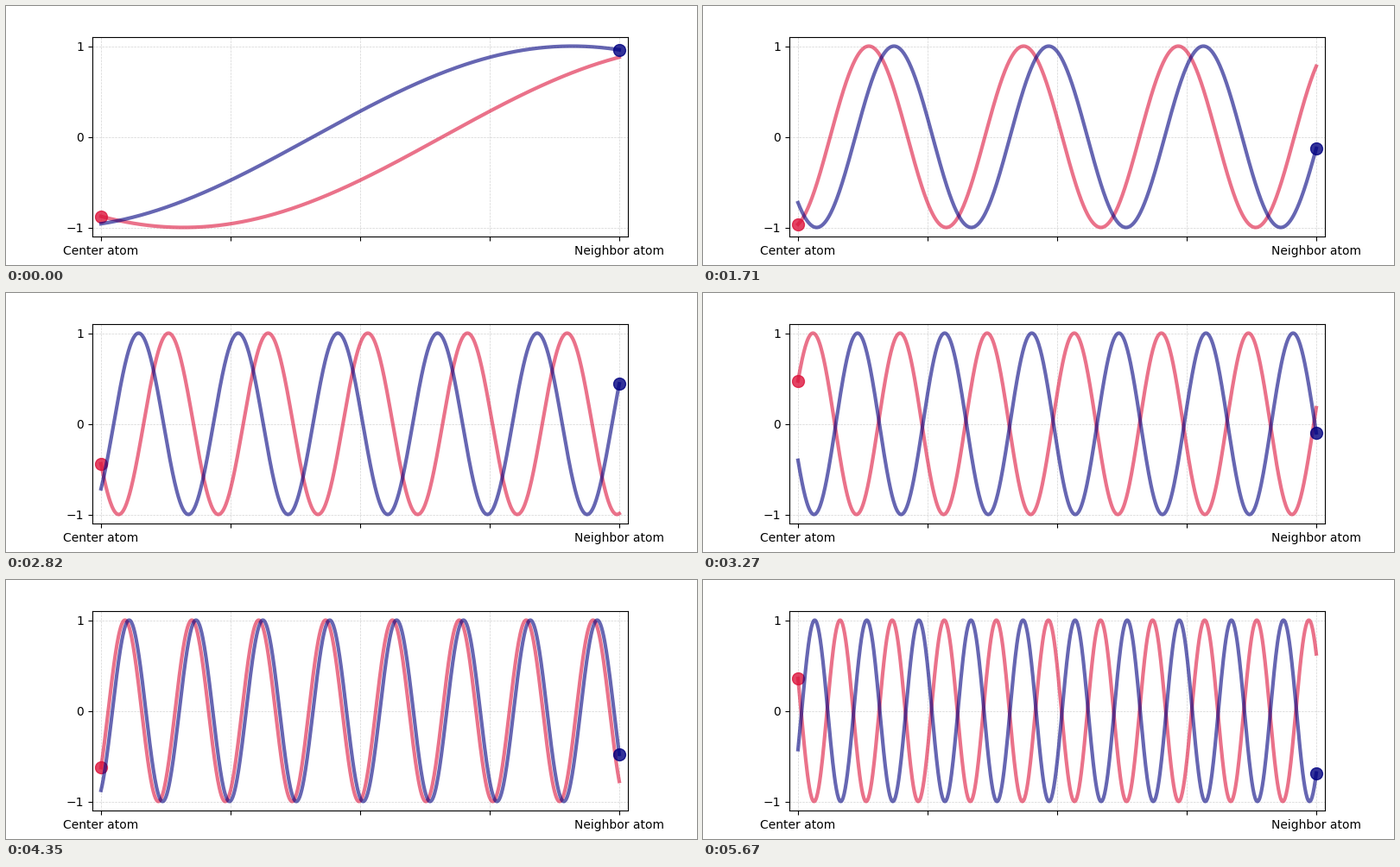
These frames come from a looping animation (800 by 300 pixels, 5700 ms). A matplotlib script:

```python
import numpy as np
import matplotlib.pyplot as plt
from matplotlib.animation import FuncAnimation

FRAMES = 190
INTERVAL = 30

# Each wave is pinned to a node at x = NODE while its wavenumber grows.
RED_NODE = 29 / 44
BLUE_NODE = 18 / 44

x = np.linspace(0, 1, 1000)


def wave(x, node, k):
    return np.sin(k * (x - node))


fig, ax = plt.subplots(figsize=(8, 3), dpi=100)
ax.set_xlim(-1 / 60, 61 / 60)
ax.set_ylim(-1.1, 1.1)
ax.set_xticks(np.linspace(0, 1, 5), ["Center atom", "", "", "", "Neighbor atom"])
ax.set_yticks([-1, 0, 1], ["\u22121", "0", "1"])
ax.grid(color="lightgrey", linestyle="--", linewidth=0.5)


def add_wave(color, node, end):
    line, = ax.plot([], [], color=color, lw=3, alpha=0.6)
    dot, = ax.plot([], [], "o", color=color, ms=10, alpha=0.8)
    return line, dot, node, end


waves = [add_wave("crimson", RED_NODE, 0), add_wave("navy", BLUE_NODE, 1)]


def update(frame):
    k = np.pi * (1 + 0.1 * frame)
    artists = []
    for line, dot, node, end in waves:
        line.set_data(x, wave(x, node, k))
        dot.set_data([end], [wave(end, node, k)])
        artists += [line, dot]
    return artists


anim = FuncAnimation(fig, update, frames=FRAMES, interval=INTERVAL,
                     repeat=True, repeat_delay=0)
plt.show()
```
